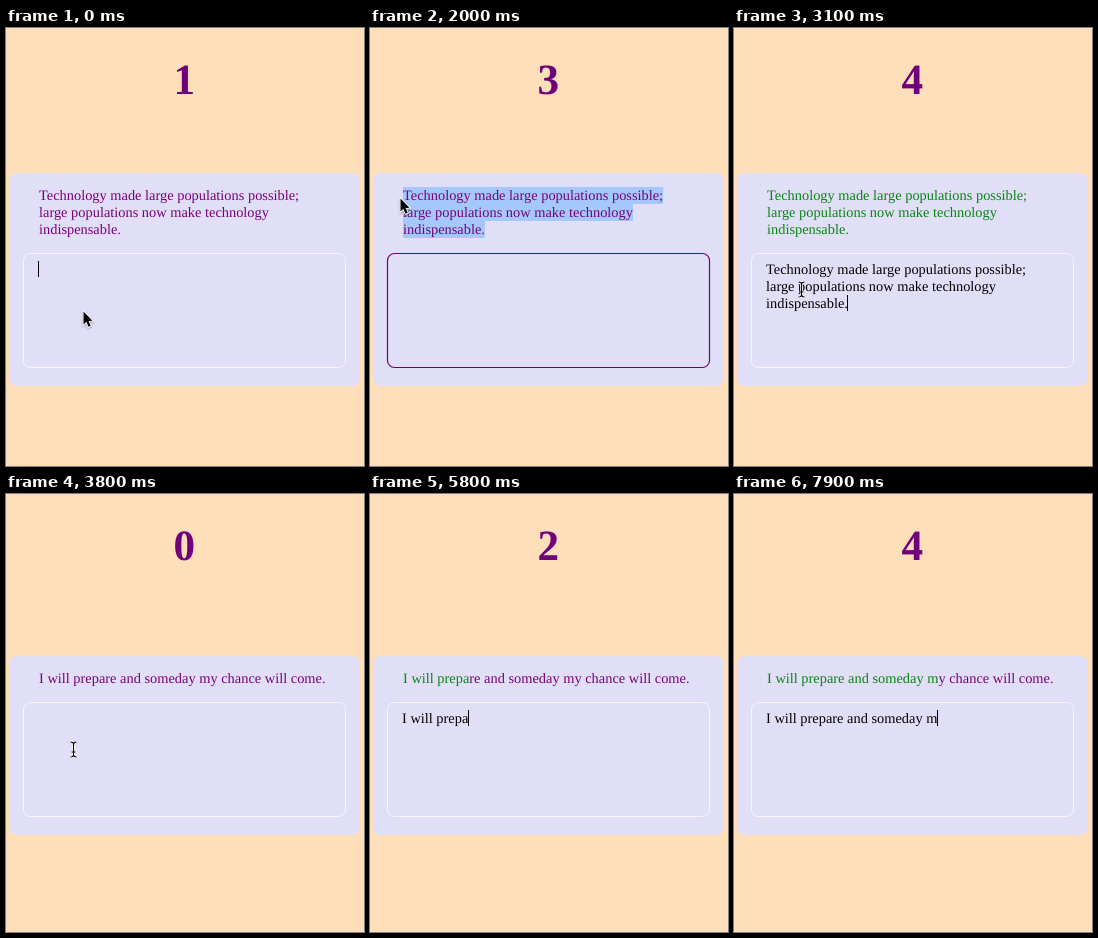
Write an HTML page with a canvas that moves like this. It is 358 by 438 pixels and loops after 8000 ms.

```html
<!DOCTYPE html>
<html lang="en">
<head>
<meta charset="utf-8">
<title>Typing test</title>
<style>
  html, body { margin: 0; width: 100%; height: 100%; overflow: hidden; background: #ffdfba; }
  canvas { display: block; }
</style>
</head>
<body>
<canvas id="stage" width="358" height="438"></canvas>
<script>
const ctx = document.getElementById('stage').getContext('2d');
const LOOP = 8000, STEP = 100, LINE = 17, ASCENT = 13;
const QUOTE_X = 33, INPUT_X = 32;
const SERIF = '"Liberation Serif", "Times New Roman", Times, serif';
const TEXT_FONT = '14.4px ' + SERIF, TIMER_FONT = 'bold 43.2px ' + SERIF;
const COLOR = {
  page: '#ffdfba', card: '#e1dff7', purple: '#78007a', timer: '#70007a',
  green: '#0a8512', ink: '#000', select: '#a4c8fb', focus: '#f6f5fd'
};

const FIRST = [
  'Technology made large populations possible;',
  'large populations now make technology',
  'indispensable.'
];
const SECOND = ['I will prepare and someday my chance will come.'];

const BLUR = 500, CLICK = 2600, PASTE = 2900, SWAP = 3200, TYPE = 4600;

// Each run types one character per step from its start time.
const RUNS = [
  [TYPE, 'I wi'], [5100, 'll prepare'], [6200, ' a'], [6500, 'nd'],
  [6900, ' '], [7100, 'someday'], [7700, ' '], [7900, 'm']
];

// Pointer stops: time, x, y
const PATH = [
  [0, 77, 283], [400, 114, 203], [500, 114, 202], [1000, 39, 177],
  [1300, 30, 170], [2200, 30, 170], [2600, 67, 261], [3500, 67, 261], [3900, 67, 254]
];

function typedAt(t) {
  return RUNS.map(([start, s]) =>
    s.slice(0, Math.max(0, Math.floor((t - start) / STEP) + 1))).join('');
}

function pointerAt(t) {
  const i = PATH.findIndex(p => p[0] > t);
  if (i < 0) return PATH[PATH.length - 1].slice(1);
  const [t0, x0, y0] = PATH[i - 1], [t1, x1, y1] = PATH[i];
  const k = (t - t0) / (t1 - t0), e = k * k * (3 - 2 * k);
  return [Math.round(x0 + (x1 - x0) * e), Math.round(y0 + (y1 - y0) * e)];
}

function textWidth(s) {
  ctx.font = TEXT_FONT;
  return ctx.measureText(s).width;
}

function drawText(s, x, top, color) {
  ctx.font = TEXT_FONT;
  ctx.textAlign = 'left';
  ctx.fillStyle = color;
  ctx.fillText(s, x, top + ASCENT);
}

function box(x, y, w, h, r) {
  ctx.beginPath();
  ctx.roundRect(x, y, w, h, r);
}

function drawTimer(n) {
  ctx.font = TIMER_FONT;
  ctx.textAlign = 'center';
  ctx.fillStyle = COLOR.timer;
  ctx.fillText(n, 178.3, 66);
}

// Highlight from the pointer position to the end of the text.
function drawSelection(t, top) {
  const [x, y] = pointerAt(t);
  const row = x < QUOTE_X ? 0 : Math.max(0, Math.min(2, Math.floor((y - top) / LINE)));
  ctx.fillStyle = COLOR.select;
  for (let i = row; i < FIRST.length; i++) {
    const s = FIRST[i];
    let from = 0;
    if (i === row) {
      let n = 0;
      while (n < s.length && QUOTE_X + (textWidth(s.slice(0, n)) + textWidth(s.slice(0, n + 1))) / 2 < x) n++;
      from = textWidth(s.slice(0, n));
    }
    ctx.fillRect(QUOTE_X + from, top + i * LINE, textWidth(s) - from, LINE);
  }
}

function drawCaret(line, top) {
  ctx.fillStyle = COLOR.ink;
  ctx.fillRect(Math.floor(INPUT_X + textWidth(line)), top, 1, 16);
}

function drawArrow(x, y) {
  ctx.save();
  ctx.translate(x + 0.5, y + 0.5);
  ctx.beginPath();
  [[0, 0], [0, 13], [2.9, 10.3], [5, 15.2], [7.2, 14.2], [5.1, 9.4], [9, 9.2]]
    .forEach(p => ctx.lineTo(...p));
  ctx.closePath();
  ctx.shadowColor = 'rgba(0,0,0,.35)';
  ctx.shadowBlur = 2;
  ctx.shadowOffsetY = 1;
  ctx.lineWidth = 1.8;
  ctx.strokeStyle = '#fff';
  ctx.stroke();
  ctx.shadowColor = 'transparent';
  ctx.fillStyle = '#000';
  ctx.fill();
  ctx.restore();
}

function drawBeam(x, y) {
  ctx.save();
  ctx.translate(x + 0.5, y + 0.5);
  ctx.beginPath();
  for (const d of [-1, 1]) {
    ctx.moveTo(-3, 7.5 * d);
    ctx.quadraticCurveTo(0, 7.5 * d, 0, 5 * d);
    ctx.quadraticCurveTo(0, 7.5 * d, 3, 7.5 * d);
  }
  ctx.moveTo(0, -5.5);
  ctx.lineTo(0, 5.5);
  ctx.moveTo(-2, 2.5);
  ctx.lineTo(2, 2.5);
  for (const [w, c] of [[2.6, 'rgba(255,255,255,.9)'], [1.1, '#000']]) {
    ctx.lineWidth = w;
    ctx.strokeStyle = c;
    ctx.stroke();
  }
  ctx.restore();
}

function drawPointer(t) {
  if (t >= TYPE) return;
  const [x, y] = pointerAt(t);
  const arrow = t < 200 || x < QUOTE_X || (t > 1300 && t < 2500);
  (arrow ? drawArrow : drawBeam)(x, y);
}

function draw(t) {
  const second = t >= SWAP;
  const lines = second ? SECOND : FIRST;
  const top = second ? 162 : 145;
  const quoteTop = top + 14;
  const inputTop = quoteTop + lines.length * LINE + 15;
  const focused = t < BLUR || t >= CLICK;
  const pasted = t >= PASTE && !second;
  const typed = second ? [typedAt(t)] : pasted ? FIRST : [''];

  ctx.fillStyle = COLOR.page;
  ctx.fillRect(0, 0, 358, 438);
  drawTimer(second ? Math.floor((t - SWAP) / 1000) : Math.floor(t / 1000) + 1);

  ctx.fillStyle = COLOR.card;
  box(3, top, 351, lines.length * LINE + 162, 8);
  ctx.fill();

  if (t >= BLUR && t < CLICK) drawSelection(Math.min(t, 1300), quoteTop);

  lines.forEach((s, i) => {
    const done = s.slice(0, (typed[i] || '').length);
    drawText(done, QUOTE_X, quoteTop + i * LINE, COLOR.green);
    drawText(s.slice(done.length), QUOTE_X + textWidth(done), quoteTop + i * LINE, COLOR.purple);
  });

  ctx.lineWidth = focused ? 1 : 1.2;
  ctx.strokeStyle = focused ? COLOR.focus : COLOR.timer;
  box(17.5, inputTop + 0.5, 322, 114, 7);
  ctx.stroke();

  const textTop = inputTop + 8;
  typed.forEach((s, i) => drawText(s, INPUT_X, textTop + i * LINE, COLOR.ink));

  const blinkOff = t >= SWAP + 500 && t < SWAP + 1000;
  const last = typed.length - 1;
  if (focused && !blinkOff) drawCaret(typed[last], textTop + last * LINE);

  drawPointer(t);
}

ctx.textRendering = 'geometricPrecision';

function tick() {
  const t = performance.now() % LOOP;
  draw(Math.floor(t / STEP) * STEP);
  requestAnimationFrame(tick);
}
tick();
</script>
</body>
</html>
```
